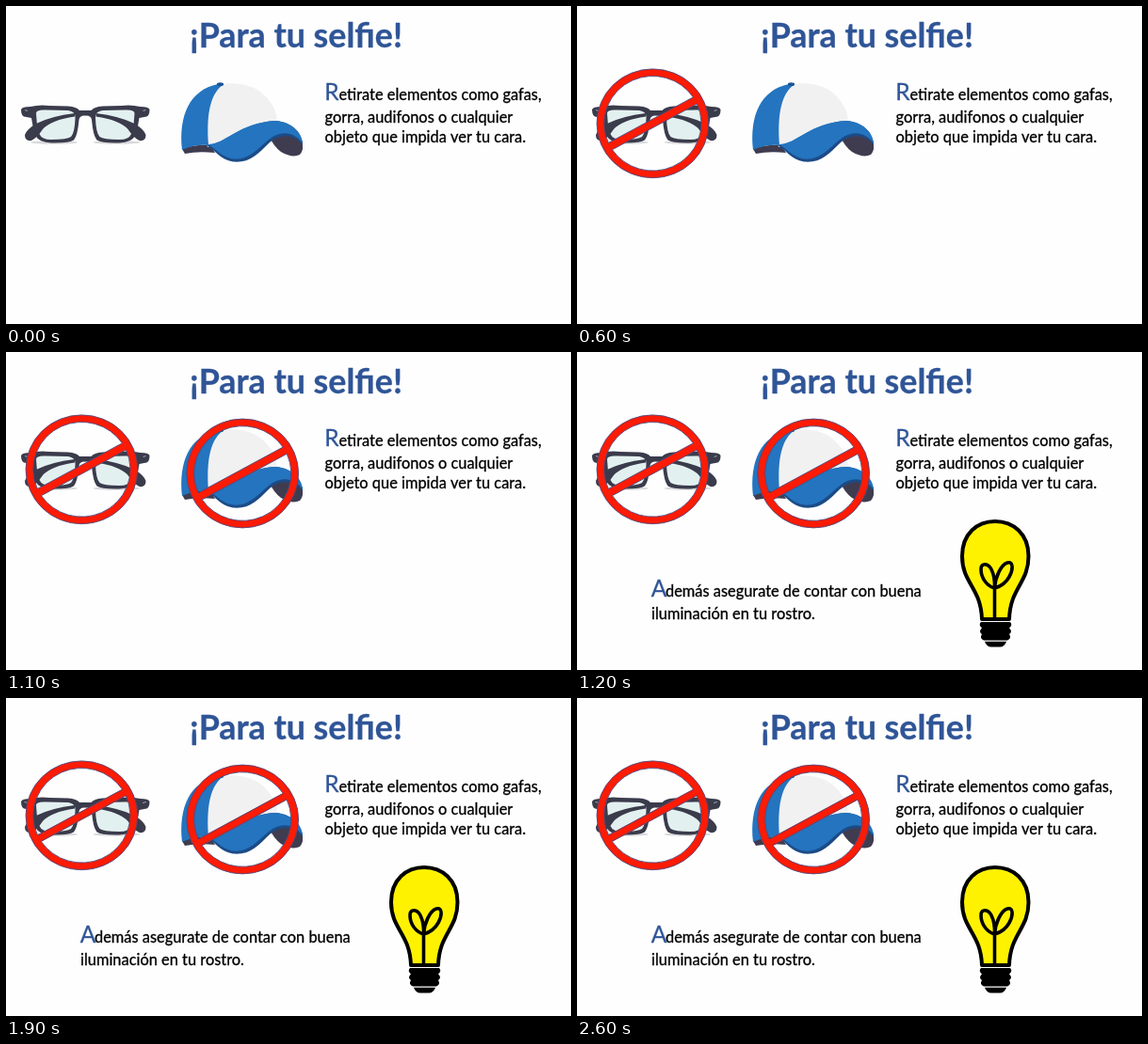
An HTML page with a canvas for the animation above (2700 ms loop, 600 by 338 pixels).

```html
<!DOCTYPE html>
<html lang="es">
<head>
<meta charset="utf-8">
<title>Para tu selfie</title>
<style>
  html, body { margin: 0; width: 100%; height: 100%; overflow: hidden; background: #fefefe; }
  canvas { display: block; }
</style>
</head>
<body>
<canvas id="stage" width="600" height="338"></canvas>
<script>
const ctx = document.getElementById('stage').getContext('2d');
const LOOP = 2700;
const BLUE = '#2f5597';
const INK = '#000';
const FRAME = '#3a3b4b';

function shape(d, fill, stroke, width = 1) {
  const path = new Path2D(d);
  if (fill) {
    ctx.fillStyle = fill;
    ctx.fill(path, 'evenodd');
  }
  if (stroke) {
    ctx.strokeStyle = stroke;
    ctx.lineWidth = width;
    ctx.stroke(path);
  }
}

function oval(x, y, rx, ry, fill) {
  ctx.beginPath();
  ctx.ellipse(x, y, rx, ry, 0, 0, Math.PI * 2);
  ctx.fillStyle = fill;
  ctx.fill();
}

// A hairline stroke gives the text its slightly heavier weight
function label(text, x, y, size, color = INK, weight = 400, align = 'left') {
  ctx.font = `${weight} ${size}px Lato, sans-serif`;
  ctx.textAlign = align;
  ctx.fillStyle = ctx.strokeStyle = color;
  ctx.lineWidth = 0.3;
  ctx.fillText(text, x, y);
  ctx.strokeText(text, x, y);
}

// Paragraph whose first letter is a large blue capital
function paragraph(x, y, initial, lines) {
  label(initial, x - 0.2, y, 24.5, BLUE);
  label(lines[0], x + 15, y, 16.4);
  lines.slice(1).forEach((line, i) => label(line, x, y + 23.6 + i * 21.2, 16.4));
}

function halfGlasses() {
  const lens = 'M32 114Q32 110 42 110.500L66 111Q74 112 73.500 119Q73 135 69 139Q65 142 48 142Q38 142 35.500 136Q32 125 32 114Z';
  oval(51, 145, 25, 1.8, '#d9d9dc');
  shape(lens, '#e3f0f0');
  shape('M73 114Q48 117 32 125Q22 131 20 137Q20 144 27 143Q33 140 39 131Q48 121 73 117.500Z', FRAME);
  shape('M16 110Q17 107 26 107Q36 104.500 46 106L66 106.500Q75 107 78 111L84.500 111L84.500 116.500Q78 116 77.500 121Q76 138 72 142.500Q67 146 48 145.500Q35 145 31.500 138Q28 128 27 119L19 117.500Q16 116 16 110Z' + lens, FRAME);
  shape('M20 110.500L23 111.500', null, '#9698a5', 1.2);
}

function glasses() {
  halfGlasses();
  ctx.save();
  ctx.translate(168.5, 0);
  ctx.scale(-1, 1);
  halfGlasses();
  ctx.restore();
}

function cap() {
  shape('M187 152Q200 147 217 148L222 156Q204 154 190 157Z', '#3f3c50');
  shape('M280 139Q298 130 314 142Q317 153 312 158Q304 162 292 155Q284 149 280 139Z', '#3f3c50');
  shape('M223 85C236 80 258 82 270 91C282 101 288 111 288 125L258 134L214 150C209 125 208 98 223 85Z', '#f1f1f2');
  shape('M230 84C215 95 213 121 215 148Q199 147 187 153C183 117 195 89 225 83Z', '#2474bf');
  shape('M213 148C234 148 246 124 287 122C305 124 315 136 315 148C307 136 291 135 280 145C267 158 259 167 241 165.500C227 163 222 153 213 148Z', '#1b4b87');
  shape('M214 147C234 147 246 124 287 122C305 124 314 135 315 146C306 133 291 132 279 142C265 154 257 164 241 162.500C227 160 223 151 214 147Z', '#2474bf');
  oval(227.5, 83.2, 3.6, 1.9, '#1c5595');
}

function prohibition(cx, cy) {
  const outer = 59.4, inner = 51.6, half = 4.2;
  const gap = Math.asin(half / inner);
  const tilt = -29 * Math.PI / 180;
  const sign = new Path2D();
  sign.arc(0, 0, outer, 0, Math.PI * 2);
  for (const turn of [tilt, tilt + Math.PI]) {
    const start = turn + gap;
    sign.moveTo(inner * Math.cos(start), inner * Math.sin(start));
    sign.arc(0, 0, inner, start, turn + Math.PI - gap);
    sign.closePath();
  }
  ctx.save();
  ctx.translate(cx, cy);
  ctx.scale(1, 0.975);
  ctx.fillStyle = '#fc1b05';
  ctx.fill(sign, 'evenodd');
  ctx.strokeStyle = '#4b4a80';
  ctx.lineWidth = 0.9;
  ctx.stroke(sign);
  ctx.restore();
}

function bulb() {
  ctx.lineCap = ctx.lineJoin = 'round';
  shape('M430 284C429 250 409 246 409 217C409 193 425 180 444 180C463 180 479.500 193 479.500 217C479.500 246 460 250 459 284Z', '#fff200', '#000', 4);
  shape('M443.500 283L443.500 251C436 249 429 241 429 231C429 223 437 225 440 231Q444 239 443.500 251C444 240 450 226 457 224C464 222 463 232 459 239Q454 248 443.500 251', null, '#000', 3.6);
  shape('M429 287H460Q463 290 459 293.500Q463 297 459 300Q462 304 457 306.500H432Q427 304 430 300Q426 297 430 293.500Q426 290 429 287Z', '#000');
  shape('M433 307.700H456Q454 313.500 449 313.500H440Q435 313.500 433 307.700Z', '#000');
}

function draw(time) {
  ctx.fillStyle = '#fefefe';
  ctx.fillRect(0, 0, 600, 338);
  label('¡Para tu selfie!', 308, 43.5, 35.8, BLUE, 700, 'center');
  glasses();
  cap();
  paragraph(338.5, 100.3, 'R', [
    'etirate elementos como gafas,',
    'gorra, audifonos o cualquier',
    'objeto que impida ver tu cara.'
  ]);
  if (time >= 200) prohibition(80.4, 124.8);
  if (time >= 700) prohibition(251.2, 129);
  if (time >= 1200) {
    paragraph(79, 260.3, 'A', [
      'demás asegurate de contar con buena',
      'iluminación en tu rostro.'
    ]);
    bulb();
  }
}

function tick() {
  draw(performance.now() % LOOP);
  requestAnimationFrame(tick);
}
tick();
</script>
</body>
</html>
```
